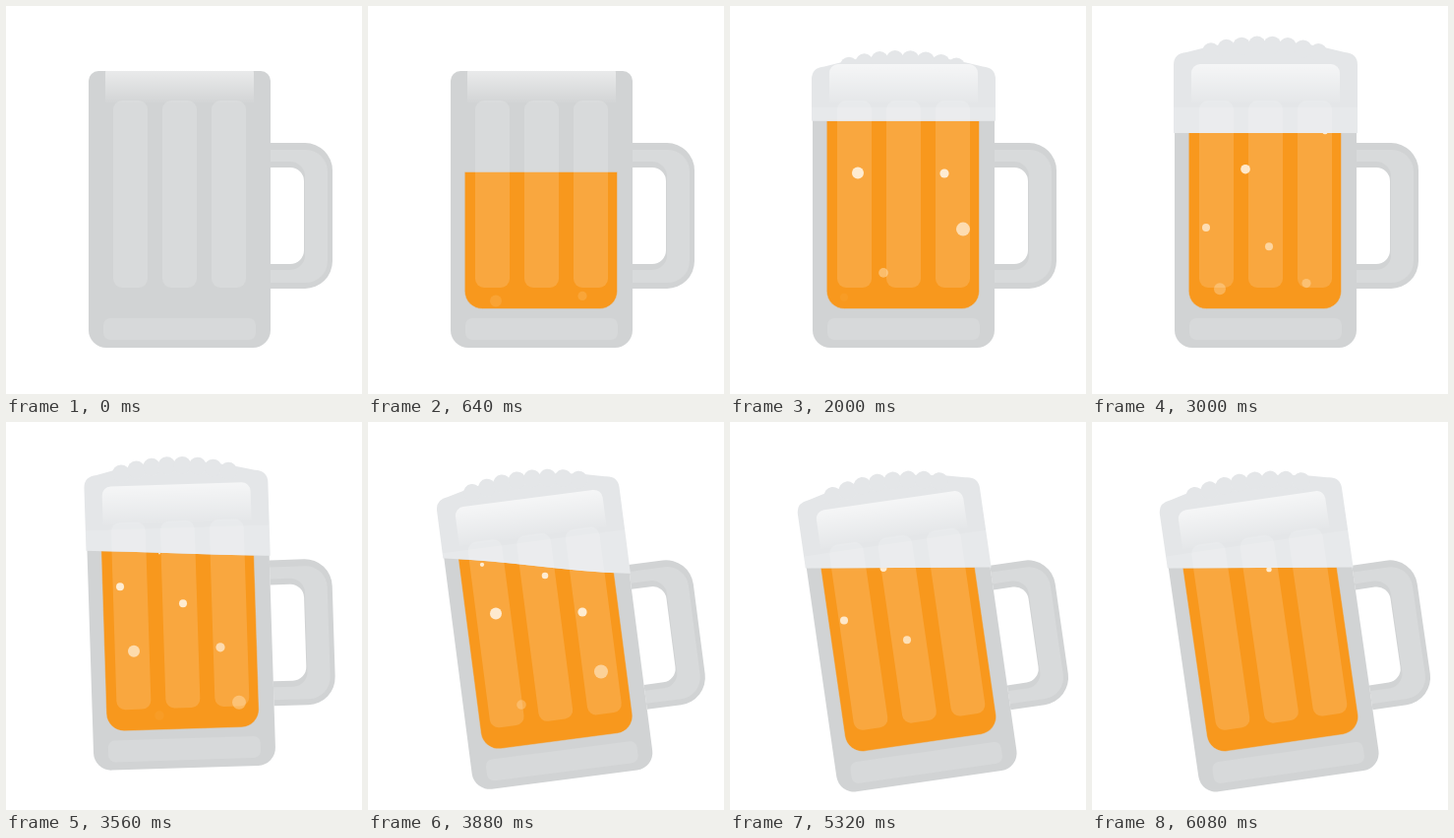
An HTML page with a canvas for the animation above (6120 ms loop, 362 px wide and 394 px high).

```html
<!DOCTYPE html>
<html lang="en">
<head>
<meta charset="utf-8">
<title>Beer mug</title>
<style>
html, body { margin: 0; width: 100%; height: 100%; overflow: hidden; background: #fff; }
canvas { display: block; }
</style>
</head>
<body>
<canvas id="stage" width="362" height="394"></canvas>
<script>
const ctx = document.getElementById('stage').getContext('2d');
const LOOP = 6120, STEP = 40;
const GLASS = '#d1d3d4', BEER = '#f8981d', FOAM = '#e4e6e8';
const PIVOT = { x: 313, y: 175 }, TILT = 8.2 * Math.PI / 180;

// Each bubble rises twice; bigger ones start lower and travel further
const RISE_TIME = 2286, REPEAT = 2105;
const BUBBLES = [
  { x: 218, r: 4.6, start: 430 },
  { x: 130, r: 6, start: 465 },
  { x: 237, r: 7, start: 960 },
  { x: 156, r: 4.8, start: 1390 },
  { x: 116, r: 4, start: 1940 },
  { x: 180, r: 4, start: 2120 }
];

const progress = (t, start, length) => Math.min(1, Math.max(0, (t - start) / length));
const sine = p => (1 - Math.cos(Math.PI * p)) / 2;
const quadOut = p => 1 - (1 - p) ** 2;
const quadInOut = p => p < .5 ? 2 * p * p : 1 - 2 * (1 - p) ** 2;
const white = a => `rgba(255,255,255,${a})`;

function box(x, y, w, h, r, fill) {
  ctx.beginPath();
  ctx.roundRect(x, y, w, h, r);
  ctx.fillStyle = fill;
  ctx.fill();
}

function disc(x, y, r, fill) {
  ctx.beginPath();
  ctx.arc(x, y, r, 0, 2 * Math.PI);
  ctx.fillStyle = fill;
  ctx.fill();
}

function tilted(angle, draw) {
  ctx.save();
  ctx.translate(PIVOT.x, PIVOT.y);
  ctx.rotate(-angle);
  ctx.translate(-PIVOT.x, -PIVOT.y);
  draw();
  ctx.restore();
}

// Draws on one side of the liquid surface: edge 0 is above, 394 below
function besideSurface(level, lean, edge, draw) {
  const left = level - lean, right = level + lean;
  ctx.save();
  ctx.beginPath();
  ctx.moveTo(0, edge);
  ctx.lineTo(0, left);
  ctx.lineTo(78, left);
  ctx.bezierCurveTo(140, level - lean * .7, 202, level + lean * .7, 264, right);
  ctx.lineTo(362, right);
  ctx.lineTo(362, edge);
  ctx.clip();
  draw();
  ctx.restore();
}

// Handle ring: outer and inner shapes share the mug wall at x = 269
function ring(outer, inner, fill) {
  ctx.beginPath();
  for (const { top, right, bottom, r } of [outer, inner])
    ctx.roundRect(269, top, right - 269, bottom - top, [0, r, r, 0]);
  ctx.fillStyle = fill;
  ctx.fill('evenodd');
}

function drawMug() {
  ring({ top: 139, right: 332, bottom: 287, r: 28 }, { top: 164, right: 303, bottom: 262, r: 14 }, GLASS);
  ring({ top: 146, right: 327, bottom: 281, r: 22 }, { top: 158, right: 304, bottom: 268, r: 15 }, white(.15));
  box(84, 66, 185, 281, [10, 10, 18, 18], GLASS);
  box(99, 317, 155, 22, 7, white(.13));
}

function drawBeer() {
  box(98.3, 60, 155.2, 247.5, [0, 0, 18, 18], BEER);
  ctx.strokeStyle = 'rgba(209,211,212,.5)';
  ctx.stroke();
}

function drawFoam(drop) {
  ctx.save();
  ctx.translate(0, drop);
  ctx.beginPath();
  ctx.moveTo(83, 220);
  ctx.lineTo(83, 60);
  ctx.quadraticCurveTo(83, 48, 96, 47);
  ctx.lineTo(114, 42.5);
  ctx.quadraticCurveTo(175, 30, 236, 42);
  ctx.lineTo(257, 47);
  ctx.quadraticCurveTo(270, 48, 270, 60);
  ctx.lineTo(270, 220);
  ctx.fillStyle = FOAM;
  ctx.fill();
  for (let x = 121; x <= 231; x += 15.6) disc(x, 39.5 + .0024 * (x - 174) ** 2, 9, FOAM);
  ctx.restore();
  box(83, 103, 187, 100, 0, white(.12));
}

function drawBubble(t, { x, r, start }) {
  for (const s of [start, start + REPEAT]) {
    const p = progress(t, s, RISE_TIME);
    const y = 284 + 3 * r - (130 + 7.5 * r) * sine(p);
    disc(x, y, r * Math.min(1, (1 - p) / .28), `rgba(255,244,226,${Math.min(.88, p * 1.5)})`);
  }
}

function drawShine() {
  for (let x = 109; x < 210; x += 50) box(x, 96, 35, 190, 9, white(.15));
  const fade = ctx.createLinearGradient(0, 59, 0, 98);
  fade.addColorStop(0, white(.64));
  fade.addColorStop(1, white(.04));
  box(101, 59, 151, 39, [9, 9, 0, 0], fade);
}

function draw(t) {
  const tilt = quadInOut(progress(t, 3320, 720));
  const angle = TILT * tilt;
  const foam = sine(progress(t, 960, 1600));
  const fill = 308 - 230 * quadOut(progress(t, 120, 1400));
  const level = Math.max(fill, 84 + 45 * foam) + 19 * tilt;
  const lean = 8.6 * Math.sin(Math.PI * progress(t, 3320, 1280)) ** 2 - .6 * tilt;

  ctx.clearRect(0, 0, 362, 394);
  tilted(angle, drawMug);
  if (t > 120) besideSurface(level, lean, 394, () => {
    tilted(angle, drawBeer);
    BUBBLES.forEach(b => drawBubble(t, b));
  });
  if (foam > 0) besideSurface(level, lean, 0, () => {
    ctx.globalAlpha = 1;
    tilted(angle, () => drawFoam(53 * (1 - foam)));
  });
  tilted(angle, drawShine);
}

function frame() {
  const t = performance.now() % LOOP;
  draw(Math.floor(t / STEP) * STEP);
  requestAnimationFrame(frame);
}
frame();
</script>
</body>
</html>
```
